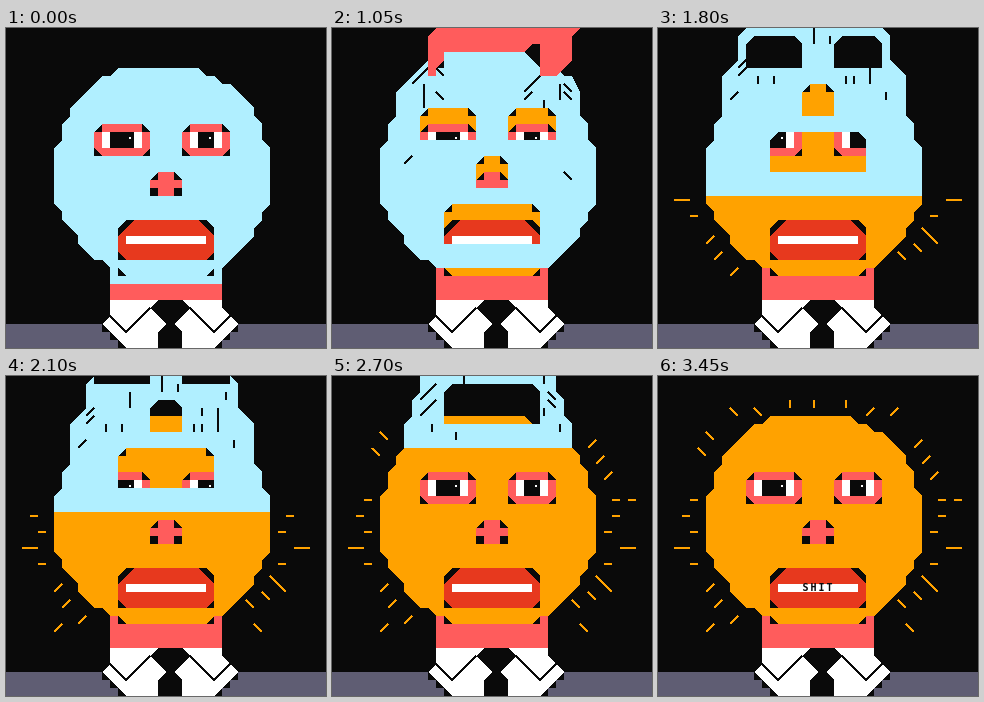
Recreate the animation shown at these times as an HTML page without scripts. Size 320 px wide and 320 px high, loop 3.6 s.

```html
<!DOCTYPE html>
<html lang="en">
<head>
<meta charset="utf-8">
<title>Mask pull</title>
<style>
html, body { margin: 0; width: 100%; height: 100%; overflow: hidden; background: #0a0a0a; }
svg { display: block; width: 100vw; height: 100vh; shape-rendering: crispEdges; }
.black { fill: #0a0a0a; }
.white { fill: #fff; }
.skin { fill: #ffa200; }
.pink { fill: #ff5c5c; }
.blue { fill: #b0efff; }
.line { fill: none; stroke: #0a0a0a; stroke-width: 2; }
.ray { fill: none; stroke: #ffa200; stroke-width: 2; }
text { font: bold 10px "DejaVu Sans Mono", monospace; letter-spacing: 2px; }

[class] { animation: 3.6s step-end infinite; }
.pull { animation-name: pull; }
.open { animation-name: open; }
.grip { animation-name: grip; }
.rest { animation-name: rest; }
.lift { animation-name: lift; }
.drag { animation-name: drag; }
.drag1 { animation-name: drag1; }
.drag2 { animation-name: drag2; }
.off { animation-name: off; }
.low { animation-name: low; }
.early { animation-name: early; }
.late { animation-name: late; }
.last { animation-name: last; }
.high { animation-name: high; }
.word { animation-name: word; }
.tail { animation-name: tail; }
.pulse { animation-name: pulse; }

@keyframes pull {
  0% { transform: translateY(0); }
  25% { transform: translateY(-8px); }
  29.16% { transform: translateY(-16px); }
  33.33% { transform: translateY(-24px); }
  37.5% { transform: translateY(-40px); }
  41.66% { transform: translateY(-56px); animation-timing-function: steps(12, end); }
  91.65% { transform: translateY(-248px); }
  91.66%, 100% { transform: translateY(-340px); }
}
@keyframes open {
  0% { visibility: hidden; transform: translate(8px, -24px); }
  4.16% { visibility: visible; transform: translate(8px, -24px); }
  8.33% { visibility: visible; transform: translate(-8px, 0); }
  12.5% { visibility: visible; transform: translate(0, 0); }
  16.66%, 100% { visibility: hidden; transform: translate(0, 0); }
}
@keyframes grip {
  0% { visibility: hidden; transform: translateY(8px); }
  16.66% { visibility: visible; transform: translateY(8px); }
  20.83%, 100% { visibility: visible; transform: translateY(0); }
}
@keyframes rest { 0% { visibility: visible; } 25%, 100% { visibility: hidden; } }
@keyframes lift { 0% { visibility: hidden; } 25% { visibility: visible; } 33.33%, 100% { visibility: hidden; } }
@keyframes drag { 0% { visibility: hidden; } 33.33% { visibility: visible; } 66.66%, 100% { visibility: hidden; } }
@keyframes drag1 { 0% { visibility: hidden; } 33.33% { visibility: visible; } 50%, 100% { visibility: hidden; } }
@keyframes drag2 { 0% { visibility: hidden; } 50% { visibility: visible; } 66.66%, 100% { visibility: hidden; } }
@keyframes off { 0% { visibility: hidden; } 66.66% { visibility: visible; } 91.66%, 100% { visibility: hidden; } }
@keyframes low { 0% { visibility: hidden; } 33.33%, 100% { visibility: visible; } }
@keyframes early { 0% { visibility: hidden; } 33.33% { visibility: visible; } 45.83%, 100% { visibility: hidden; } }
@keyframes late { 0% { visibility: hidden; } 45.83%, 100% { visibility: visible; } }
@keyframes last { 0% { visibility: hidden; } 54.16%, 100% { visibility: visible; } }
@keyframes high { 0% { visibility: hidden; } 75%, 100% { visibility: visible; } }
@keyframes word { 0% { visibility: hidden; } 79.16%, 100% { visibility: visible; } }
@keyframes tail { 0% { visibility: hidden; } 87.5%, 100% { visibility: visible; } }
@keyframes pulse { 0% { visibility: hidden; } 91.66% { visibility: visible; } 95.83%, 100% { visibility: hidden; } }
</style>
</head>
<body>
<svg viewBox="0 0 320 320">
  <defs>
    <path id="head" d="M112 40H192L200 48H208L216 56H224L248 80V88L256 96V112L264 120V176L256 184V192L248 200V208L216 240H208V248H112V240H104L96 232H88L72 216V208L56 192V184L48 176V120L56 112V96L64 88V80L72 72 96 48H104Z"/>
    <path id="holes" d="M96 96h40l8 8v24h-56v-24zM184 96h32l8 8v24h-48v-24zM152 144h16l8 8v24h-32v-24zM120 192h80l8 8v32h-96v-32z"/>
    <path id="corners" d="M96 96v8h-8zM136 96v8h8zM184 96v8h-8zM216 96v8h8zM152 144v8h-8zM168 144v8h8zM120 192v8h-8zM200 192v8h8z"/>
    <!-- The cloth ends where the pulled rectangle ends -->
    <mask id="cloth" maskUnits="userSpaceOnUse" x="0" y="0" width="320" height="320">
      <g class="pull">
        <path fill="#fff" d="M0-100H320V256H0Z"/>
        <use href="#holes" fill="#000"/>
      </g>
    </mask>
    <mask id="bare" maskUnits="userSpaceOnUse" x="0" y="0" width="320" height="320">
      <path fill="#fff" d="M0 0H320V320H0Z"/>
      <g class="pull"><path fill="#000" d="M0-100H320V256H0Z"/></g>
    </mask>
  </defs>

  <path class="black" d="M0 0H320V320H0Z"/>
  <path fill="#5f5d73" d="M0 296H320V320H0Z"/>

  <!-- Neck, collar and tie -->
  <path class="pink" d="M104 240H216V272H104Z"/>
  <path class="black" d="M104 272H216V288L232 296V304H224V312H216V320H112V312H104V304H96V296L104 288Z"/>
  <path class="white" d="M104 272H152L144 280 160 296 152 304V320H120L96 296 104 288Z"/>
  <path class="white" d="M176 272H216V280L232 296 208 320H176V304L168 296 184 280Z"/>
  <path class="line" d="M104 288 120 304 144 280M184 280 208 304 224 288"/>

  <!-- Face -->
  <use href="#head" class="skin"/>
  <path class="black" d="M96 96h40l8 8v24h-56v-24zM184 96h32l8 8v24h-48v-24zM152 144h16l8 8v16h-32v-16zM120 192h80l8 8v32h-96v-32z"/>
  <path class="pink" d="M96 96H136V104H144V120L136 128H96L88 120V104H96ZM184 96H216V104H224V120L216 128H184L176 120V104H184Z"/>
  <path class="white" d="M96 104H136V120H96ZM184 104H216V120H184Z"/>
  <path class="black" d="M104 104H128V120H104ZM192 104H208V120H192Z"/>
  <path class="white" d="M123 109h2v2h-2zM203 109h2v2h-2z"/>
  <path class="pink" d="M152 144H168V152H176V160H168V168H152V160H144V152H152Z"/>
  <use href="#corners" class="black"/>
  <path fill="#e7391e" d="M128 192H192L208 208V224L200 232H120L112 224V208Z"/>
  <path class="white" d="M120 208H200V216H120Z"/>
  <text class="word black" x="144.5" y="215">SH<tspan class="tail">IT</tspan></text>

  <!-- Rays around the bare part of the head -->
  <g class="ray" mask="url(#bare)">
    <path d="M24 140h8M32 156h8M16 172h16M32 188h8M48 216l8-8M56 232l8-8"/>
    <path d="M280 140h8M272 156h8M288 172h16M272 188h8"/>
    <path d="M32 124h8M280 124h8M296 124h8M272 104l8-8M264 88l8-8M40 72l8 8"/>
    <path d="M72 32l8 8M96 32l8 8M208 40l8-8M232 40l8-8M132 24v8M156 24v8M188 24v8"/>
    <path class="early" d="M256 208l8 8M248 224l8 8M240 240l8 8"/>
    <path class="late" d="M264 200l16 16M256 216l8 8M240 224l8 8"/>
    <path class="low" d="M72 248l8-8"/>
    <path class="last" d="M48 256l8-8M248 248l8 8"/>
  </g>
  <path class="ray high" d="M48 56l8 8M256 72l8-8"/>
  <path class="ray pulse" d="M132 8v16M156 8v16M188 8v16M64 24l8 8M240 32l8-8M24 156h8M24 188h8M280 156h8M280 188h8M288 140h8"/>

  <!-- Stretching cloth -->
  <g mask="url(#cloth)">
    <g class="blue">
      <use href="#head"/>
      <path d="M104 232H216V256H104Z"/>
      <path class="lift" d="M64 88V64L80 48 96 32 104 24H208L232 48H240L248 64V88Z"/>
      <path class="drag" d="M64 88V48L80 32V8L88 0H224L232 8V32L248 48V88Z"/>
      <path class="off" d="M72 80V48L80 40V24L88 16V0H224V16L232 24V40L240 48V80Z"/>
    </g>
    <g class="line">
      <path class="lift" d="M80 56 96 40M92 56V80M104 64 112 72M104 40 112 48M72 136 80 128M192 64 208 48M192 72 200 64M212 72V80M228 56V72M232 56 240 64M232 64 240 72M232 144 240 152"/>
      <path class="drag1" d="M80 24 96 8M80 40 92 28M92 24V32M104 8 120 24M108 24 118 36M192 32 208 16M200 38 212 24M212 24V32M216 8 232 24M224 32 240 48M228 48V56M228 64V72"/>
      <path class="drag2" d="M80 40 88 32M80 48 88 40M72 72 80 64M100 48V56M116 48V56M124 16V32M156 0V16M172 8V16M188 48V56M196 32V40M196 48V56M212 32V56M220 16V24M228 64V72"/>
      <path class="off" d="M88 24 104 8M88 40 104 24M100 48V56M124 56V64M132 0V8M212 0V8M216 16 224 24M216 24 224 32M212 32V40M228 48V56"/>
    </g>
  </g>
  <path class="rest blue" d="M144 168H176V176H144Z"/>
  <g class="pull"><use href="#corners" class="black"/></g>
  <path class="black" d="M112 240V248H120ZM208 240V248H200Z"/>

  <!-- Hand -->
  <g class="open">
    <path class="pink" d="M152 0V-30H256V8L248 16V40L240 48V64H232L224 48 216 40H112L96 48 88 56V64H80V40L96 28 120 20 136 12Z"/>
    <path class="black" d="M192 40 200 32H216V40L224 48H208Z"/>
  </g>
  <g class="pull"><g class="grip">
    <path class="pink" d="M152 0V-40H256V8L240 24V48L224 64H208V48L200 40H112V48L104 56V64H96V24L104 16 120 8Z"/>
    <path class="black" d="M192 40 200 32H208V56L200 48ZM112 48V56H104Z"/>
  </g></g>
</svg>
</body>
</html>
```
